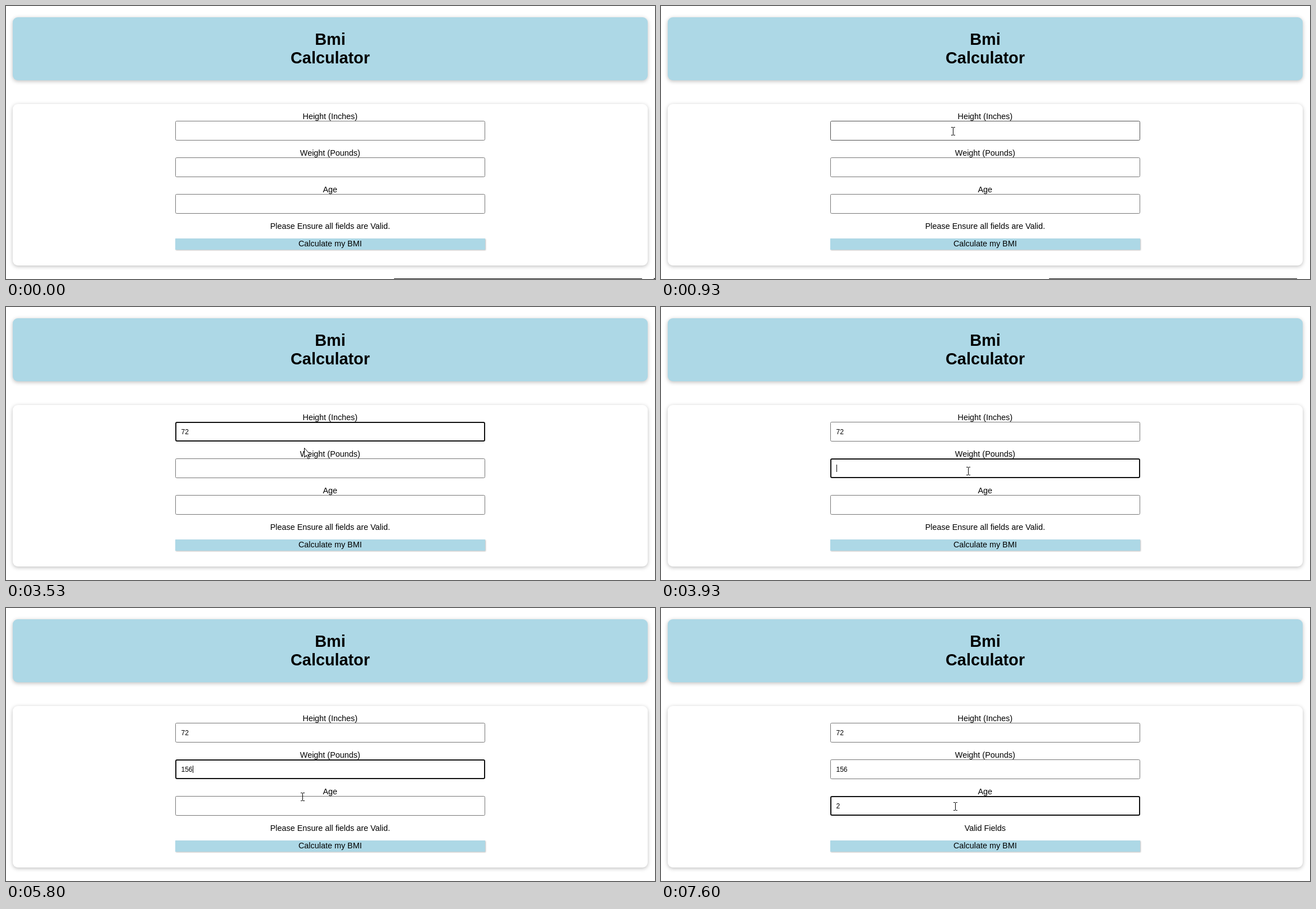
Recreate the animation shown at these times as an HTML page. Size 1154x485 px, loop 8 s.

```html
<!DOCTYPE html>
<html lang="en">
<head>
<meta charset="utf-8">
<title>Bmi Calculator</title>
<style>
  html, body { margin: 0; width: 100%; height: 100%; overflow: hidden; background: #fff; }
  body { position: relative; }
  .card {
    position: absolute; left: 12px; width: 1129px;
    border-radius: 9px; box-shadow: 0 1.8px 7.2px rgba(0, 0, 0, .26);
  }
  #head { top: 20px; height: 112px; background: #add8e6; }
  #form { top: 174px; height: 287px; background: #fff; }
  #button {
    position: absolute; left: 301px; top: 413px; width: 551px; height: 20px;
    background: #add8e6; box-shadow: 1px 1px 2px rgba(0, 0, 0, .26);
  }
  #bar {
    position: absolute; left: 690px; top: 484px; width: 441px; height: 1px;
    background: #222; box-shadow: 0 0 3px rgba(0, 0, 0, .25);
  }
  svg { position: absolute; left: 0; top: 0; display: block; }
  text { font: 14.4px "Liberation Sans", Arial, sans-serif; text-anchor: middle; fill: #000; }
  text.title { font-size: 28.8px; font-weight: bold; }
  text.value { font-size: 12px; text-anchor: start; }
</style>
</head>
<body>
<div class="card" id="head"></div>
<div class="card" id="form"></div>
<div id="button"></div>
<div id="bar"></div>
<svg id="stage" width="1154" height="485" viewBox="0 0 1154 485">
  <text class="title" x="576.5" y="69">Bmi</text>
  <text class="title" x="576.5" y="102">Calculator</text>
  <g id="fields"></g>
  <text id="message" x="576.3" y="396"></text>
  <text x="576.3" y="427">Calculate my BMI</text>
  <rect id="caret" width="1" height="13"/>
  <path id="arrow" d="M.5 .5v16.5l3.8-3.7 2.8 6.6 2.4-1-2.8-6.5h4.6z" fill="#fff" stroke="#000"/>
  <path id="beam" d="M0-6h1V7h-1zM-3-7h3v1h-3zM1-7h3v1h-3zM-3 7h3v1h-3zM1 7h3v1h-3z"/>
</svg>
<script>
const LOOP = 8000, STEP = 200 / 3, BLINK = 8;
const $ = id => document.getElementById(id);

// Mouse path: step, x, y
const path = [
  [0, 1152, 483], [1, 1134, 471], [2, 1119, 460], [5, 1119, 460], [6, 1098, 448],
  [8, 930, 358], [10, 700, 250], [12, 570, 200], [13, 535, 212], [14, 519, 222],
  [51, 519, 222], [56, 546, 291], [82, 546, 291], [87, 527, 335], [89, 523, 352]
];

// Clicks and key presses: step, field, value
const edits = [
  [17, 0, ""], [37, 0, "7"], [40, 0, "72"],
  [59, 1, ""], [68, 1, "1"], [74, 1, "15"], [82, 1, "156"],
  [94, 2, ""], [106, 2, "2"]
];
const caretX = [312, 318, 324, 332];

function add(name, attrs, label = "") {
  const el = document.createElementNS("http://www.w3.org/2000/svg", name);
  set(el, attrs);
  el.textContent = label;
  $("fields").append(el);
  return el;
}

function set(el, attrs) {
  for (const key in attrs) el.setAttribute(key, attrs[key]);
}

const fields = ["Height (Inches)", "Weight (Pounds)", "Age"].map((label, i) => {
  const top = 204 + 65 * i;
  add("text", { x: 576.3, y: top - 3 }, label);
  return {
    top,
    box: add("rect", { fill: "#fff", rx: 2 }),
    value: add("text", { class: "value", x: 311.5, y: top + 22 })
  };
});

function mouseAt(step) {
  const next = path.findIndex(p => p[0] > step);
  if (next < 0) return path[path.length - 1].slice(1);
  const [s0, x0, y0] = path[next - 1], [s1, x1, y1] = path[next];
  const u = (step - s0) / (s1 - s0);
  return [Math.round(x0 + (x1 - x0) * u), Math.round(y0 + (y1 - y0) * u)];
}

function draw(time) {
  const step = Math.floor((time + 3.4) / STEP);
  const done = edits.filter(e => e[0] <= step);
  const last = done[done.length - 1];
  const [x, y] = mouseAt(step);
  let overField = false;

  fields.forEach(({ top, box, value }, i) => {
    const inside = x >= 301 && x < 852 && y >= top && y < top + 35;
    overField = overField || inside;
    const width = last && last[1] === i ? 2 : 1;
    set(box, {
      x: 301 + width / 2, y: top + width / 2,
      width: 551 - width, height: 35 - width,
      "stroke-width": width,
      stroke: width === 2 ? "#101010" : inside && y > top + 1 ? "#4f4f4f" : "#767676"
    });
    const mine = done.filter(e => e[1] === i).pop();
    value.textContent = mine ? mine[2] : "";
  });

  const lit = last && Math.floor((step - last[0]) / BLINK) % 2 === 0;
  $("caret").style.display = lit ? "" : "none";
  if (last) set($("caret"), { x: caretX[last[2].length], y: fields[last[1]].top + 11 });

  $("message").textContent = last && last[1] === 2 && last[2]
    ? "Valid Fields" : "Please Ensure all fields are Valid.";
  $("bar").style.display = last ? "none" : "";

  $("beam").style.display = overField ? "" : "none";
  $("arrow").style.display = overField ? "none" : "";
  set(overField ? $("beam") : $("arrow"), { transform: `translate(${x} ${y})` });
}

const start = performance.now();
function tick() {
  draw((performance.now() - start) % LOOP);
  requestAnimationFrame(tick);
}
tick();
</script>
</body>
</html>
```
